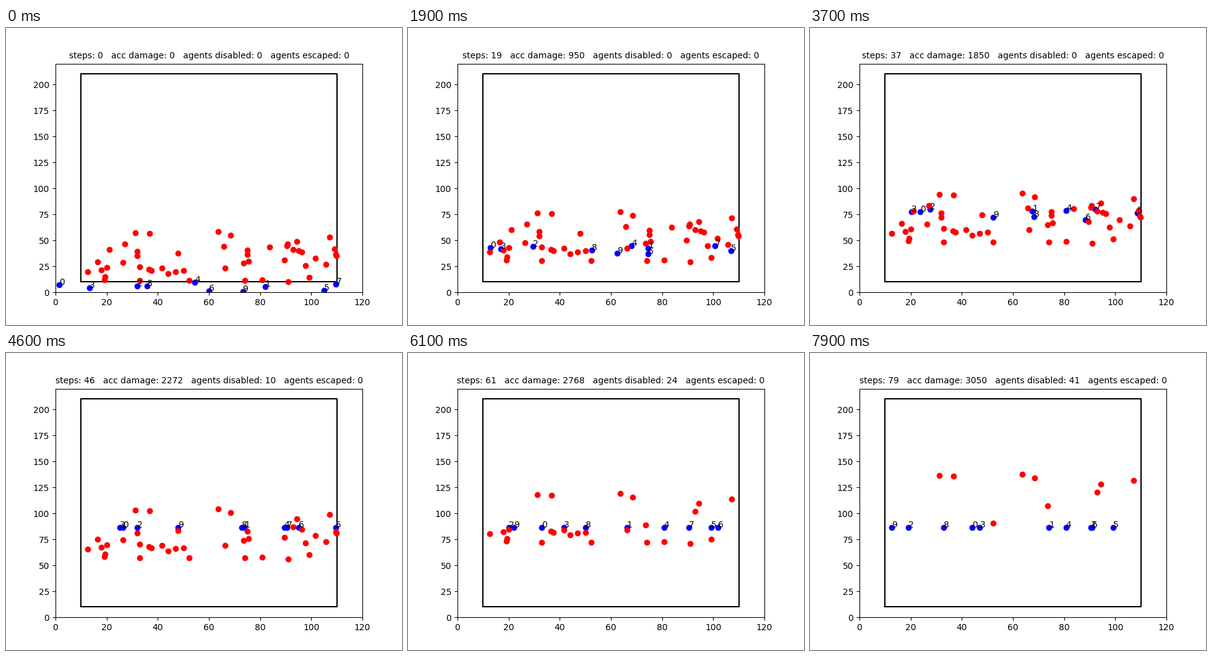
Animation of 640x480 px, one loop 8000 ms. Source, as a matplotlib script:

```python
import numpy as np
import matplotlib.pyplot as plt
from matplotlib.animation import FuncAnimation

STEPS = 80
SPEED = 2.0      # defender speed, intruders climb 1 per step
LINE = 86.4      # height at which defenders wait
CATCH_Y = 85.05  # intruders can be caught from here on
REACH = 0.27

# Each defender: start point, then the intruders it intercepts, in order.
PLANS = [
    ((1.5, 7.0), [(26.4, 28.6), (32.95, 24.5), (36.6, 21.95), (37.6, 20.9), (44.1, 18.0)]),
    ((81.9, 5.2), [(65.9, 44.1), (75.1, 36.7), (75.5, 29.8), (66.2, 23.2), (74.15, 11.4)]),
    ((31.9, 6.0), [(27.1, 46.5), (31.95, 39.3), (16.5, 29.15), (20.1, 23.8),
                   (17.9, 21.5), (19.35, 14.9), (19.1, 12.3)]),
    ((13.4, 4.0), [(21.05, 41.15), (31.95, 35.2), (41.7, 23.3), (47.05, 19.95)]),
    ((54.5, 9.4), [(83.8, 43.6), (89.4, 30.9), (80.7, 11.95)]),
    ((105.1, 2.2), [(109.0, 41.7), (109.6, 36.4), (109.95, 35.2), (97.8, 25.6), (99.2, 14.4)]),
    ((60.1, 1.6), [(95.0, 40.0), (96.4, 38.7), (101.5, 32.8), (105.8, 26.8), (91.05, 10.2)]),
    ((109.7, 8.1), [(90.75, 46.5), (90.5, 44.8)]),
    ((35.9, 6.3), [(74.9, 40.5), (50.0, 20.9), (32.95, 11.4)]),
    ((73.2, 1.0), [(48.0, 37.6), (12.6, 19.6)]),
]
UNCAUGHT = [(31.3, 57.2), (36.8, 56.6), (63.7, 58.4), (68.55, 54.8), (73.6, 28.0),
            (52.35, 11.4), (93.0, 41.2), (94.4, 48.8), (107.2, 52.8)]


def simulate():
    pos = np.array([start for start, _ in PLANS], float)
    queues = [list(targets) for _, targets in PLANS]
    goals = [q[0] for q in queues]
    total = sum(map(len, queues)) + len(UNCAUGHT)
    damage = caught = 0
    history = []
    for t in range(STEPS):
        if t:
            damage += total - caught
            for i, queue in enumerate(queues):
                gap = np.array([goals[i][0], LINE]) - pos[i]
                dist = np.hypot(*gap)
                pos[i] += gap * min(1, SPEED / max(dist, 1e-9))
                while (queue and queue[0][1] + t >= CATCH_Y
                       and np.hypot(queue[0][0] - pos[i, 0], LINE - pos[i, 1]) < REACH):
                    queue.pop(0)
                    caught += 1
                    if queue:
                        goals[i] = queue[0]
        reds = np.array(UNCAUGHT + [r for q in queues for r in q]) + (0, t)
        title = (f"steps: {t}   acc damage: {damage}   "
                 f"agents disabled: {caught}   agents escaped: 0")
        history.append((pos.copy(), reds, title))
    return history


HISTORY = simulate()

plt.rcParams["font.family"] = "DejaVu Sans"
fig, ax = plt.subplots(figsize=(6.4, 4.8), dpi=100)
ax.set_xlim(0, 120)
ax.set_ylim(0, 220)
ax.plot([10, 110, 110, 10, 10], [10, 10, 210, 210, 10], color="black", lw=1.5)
defenders, = ax.plot([], [], "o", color="blue", ms=6)
intruders, = ax.plot([], [], "o", color="red", ms=6)
labels = [ax.text(0, 0, str(i), fontsize=10) for i in range(len(PLANS))]
title = ax.set_title("", fontsize=10)


def update(t):
    blues, reds, caption = HISTORY[t]
    defenders.set_data(blues[:, 0], blues[:, 1])
    intruders.set_data(reds[:, 0], reds[:, 1])
    for label, p in zip(labels, blues):
        label.set_position(p)
    title.set_text(caption)
    return [defenders, intruders, title, *labels]


anim = FuncAnimation(fig, update, frames=STEPS, interval=100,
                     repeat=True, repeat_delay=0, blit=False)
plt.show()
```
